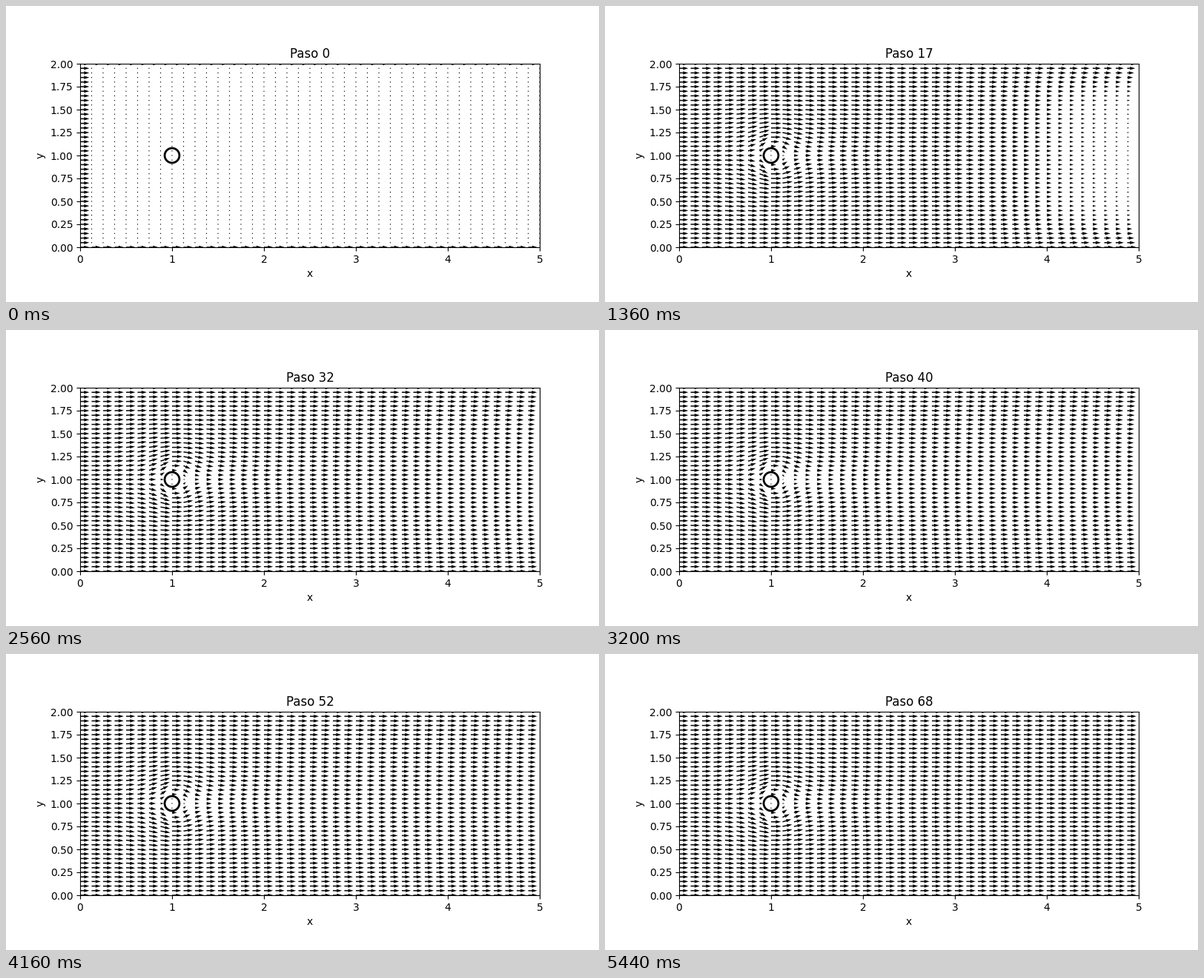
Recreate the animation shown at these times as a matplotlib script. Size 800 px wide and 400 px high, loop 5.52 s.

```python
import math

import numpy as np
import matplotlib.pyplot as plt
from matplotlib.animation import FuncAnimation

STEPS, INTERVAL = 69, 80
LX, LY, N = 5, 2, 41
CX, CY, R = 1, 1, 0.08

xs, ys = np.linspace(0, LX, N), np.linspace(0, LY, N)
X, Y = np.meshgrid(xs, ys)
DX, DY = X - CX, Y - CY
R2 = DX**2 + DY**2
erfc = np.vectorize(math.erfc)

# Stream speed at x = 0..5 once the front has reached the outlet
FRONT_END = 17
KEY_STEPS = [24, 32, 40, 52, 68]
KEY_SPEEDS = np.array([
    [1, 0.99, 0.96, 0.91, 0.76, 0.50],
    [1, 0.98, 0.92, 0.83, 0.73, 0.62],
    [1, 0.95, 0.83, 0.74, 0.70, 0.68],
    [1, 0.95, 0.86, 0.81, 0.79, 0.78],
    [1, 0.98, 0.95, 0.96, 0.97, 0.98],
])


def front(s):
    """Speed along x while the inflow front crosses the channel."""
    if s == 0:
        return np.where(xs == 0, 1.0, 0.0)
    reach = 1.7 * (s / 8) ** 1.15
    steep = max(1.6, 3.2 + 0.42 * (s - 8))
    return 1 / (1 + (xs / reach) ** steep)


def stream(s):
    if s <= FRONT_END:
        return front(s)
    rows = [front(FRONT_END)]
    rows += [np.interp(xs, range(LX + 1), k) for k in KEY_SPEEDS]
    times = [FRONT_END] + KEY_STEPS
    i = min(np.searchsorted(times, s), len(times) - 1)
    f = (s - times[i - 1]) / (times[i] - times[i - 1])
    return rows[i - 1] * (1 - f) + rows[i] * f


def wall_layer(s):
    """Drag of the moving walls, spreading inwards by diffusion."""
    depth = np.minimum(ys, LY - ys)
    if s == 0:
        return np.where(depth < 1e-9, 1.0, 0.0)
    return erfc(depth / (2 * math.sqrt(0.00177 * s)))


def velocity(s):
    base = stream(s)[None, :]
    wall = wall_layer(s)[:, None]
    u = base + (1 - base) * wall

    # Softened dipole around the cylinder
    a2 = 0.04
    soft = a2 / (R2 + a2) / np.maximum(R2, 1e-9)
    v = -u * soft * 2 * DX * DY
    v *= np.where(DX > 0, 0.8, 1) * (1 - DY**4) * np.minimum(1, X / 0.4)
    bend = 1 - 0.5 * soft * (DX**2 - DY**2) * (1 - DY**4) * np.minimum(1, X / 0.4)

    # Wake and no-slip at the surface
    slow = 0.45 * (1 + 0.4 * math.exp(-((s - 40) / 7) ** 2))
    behind = np.maximum(DX, 0)
    wake = slow * np.exp(-behind / 0.9 - (DY / (0.12 + 0.12 * behind)) ** 2)
    wake[DX <= 0] = 0
    slip = 1 - np.exp(-R2 / 0.14**2)
    u = u * bend * (1 - wake) * slip
    v = v * slip

    solid = R2 <= R**2
    u[solid] = v[solid] = 0
    u[[0, -1]] = 1
    v[[0, -1]] = 0
    return u, v


fig, ax = plt.subplots(figsize=(8, 4), dpi=100)
arrows = ax.quiver(X, Y, *velocity(0), scale=50)
ax.add_patch(plt.Circle((CX, CY), R, color="k", fill=False, lw=2))
ax.set_xlim(0, LX)
ax.set_ylim(0, LY)
ax.set_aspect("equal")
ax.set_xlabel("x")
ax.set_ylabel("y")
title = ax.set_title("Paso 0")


def update(s):
    arrows.set_UVC(*velocity(s))
    title.set_text(f"Paso {s}")
    return arrows, title


anim = FuncAnimation(fig, update, frames=STEPS, interval=INTERVAL, repeat=True, repeat_delay=0)
plt.show()
```
